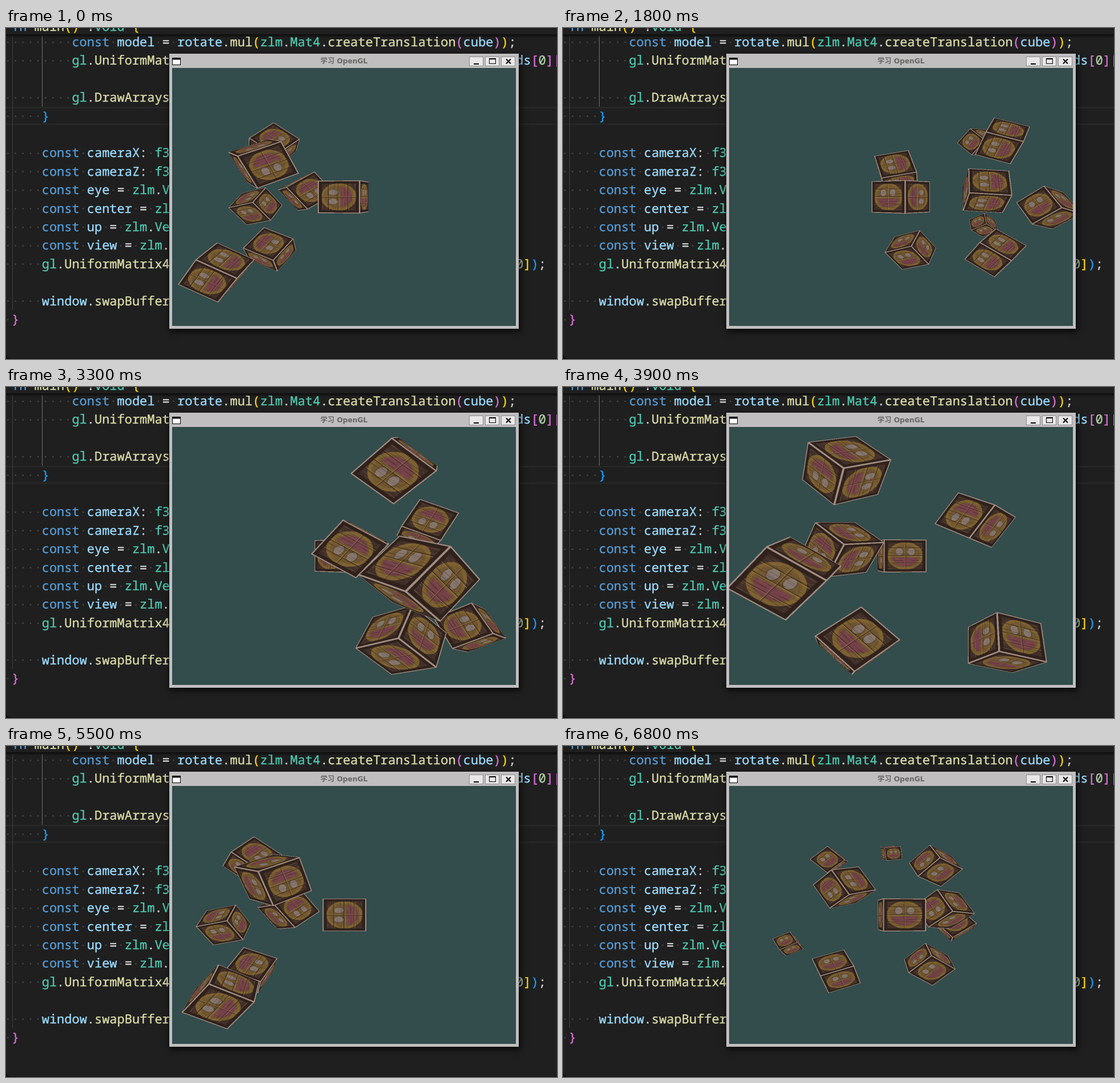
Recreate the animation shown at these times as an HTML page with a canvas. Size 965 by 580 pixels, loop 6.9 s.

```html
<!DOCTYPE html>
<html lang="en">
<head>
<meta charset="utf-8">
<title>Orbiting crates</title>
<style>
  html, body { margin: 0; width: 100%; height: 100%; overflow: hidden; background: #1f1f1f; }
  #stage { position: relative; width: 965px; height: 580px; overflow: hidden; background: #1f1f1f; }
  #editor { position: absolute; left: 0; top: 0; }
  #editor text {
    font: 21.97px "Noto Sans Mono", "DejaVu Sans Mono", monospace;
    text-rendering: geometricPrecision; white-space: pre; stroke-width: .35px;
  }
  #win {
    position: absolute; left: 286px; top: 45px; width: 612px; height: 482px;
    background: #c1bebf; box-shadow: 2px 4px 10px 1px rgba(0,0,0,.75);
  }
  #title {
    position: absolute; left: 0; right: 0; top: 4px; height: 19px;
    text-align: center; color: #696765;
    font: bold 12.2px/19px "DejaVu Sans", "Noto Sans CJK SC", "Noto Sans CJK", sans-serif;
  }
  #chrome { position: absolute; left: 0; top: 0; }
  #view { position: absolute; left: 5px; top: 25px; width: 602px; height: 452px; background: #334c4c; }
</style>
</head>
<body>
<div id="stage">
  <svg id="editor" width="965" height="580">
    <defs>
      <linearGradient id="fade" x1="0" y1="0" x2="0" y2="1">
        <stop offset="0" stop-color="#000" stop-opacity=".6"/>
        <stop offset="1" stop-color="#000" stop-opacity="0"/>
      </linearGradient>
    </defs>
    <path d="M0 139.5H965M0 168.5H965" stroke="#2b2b2b" stroke-width="2"/>
    <path d="M11.5 14V494" stroke="#404040"/>
    <path d="M63.5 14V138" stroke="#707070"/>
    <g id="code"></g>
    <rect y="11" width="965" height="6" fill="url(#fade)"/>
    <path d="M0 571Q1 579 9 579H965V580H0Z" fill="#111"/>
  </svg>
  <div id="win">
    <div id="title">学习 OpenGL</div>
    <svg id="chrome" width="612" height="26" fill="none" stroke="#000">
      <rect x="5.5" y="7.5" width="14" height="12" fill="#fff"/>
      <path d="M5 9H20" stroke-width="3"/>
      <g fill="#e9e7e7" stroke="#8d8a8b">
        <rect x="525.5" y="5.5" width="24" height="16"/>
        <rect x="553.5" y="5.5" width="24" height="16"/>
        <rect x="581.5" y="5.5" width="24" height="16"/>
      </g>
      <path d="M533 18H542" stroke-width="2"/>
      <rect x="560.5" y="8.5" width="11" height="9"/>
      <path d="M560 9.5H572"/>
      <path d="M590 9.5L598 17.5M598 9.5L590 17.5" stroke-width="2"/>
    </svg>
    <canvas id="view" width="1204" height="904"></canvas>
  </div>
</div>
<script>
// ---- Editor text: [row, column, first bracket level, code]
const CELL = 13.18, LEFT = 10, PITCH = 32.4, BASE = 32;
const BRACKETS = ['#ffd700', '#da70d6', '#179fff'];
const TEAL = /^(zlm|gl|Mat4|Vec3|f32|void)$/, KEYWORD = /^(const|fn)$/;
const LINES = [
  [-0.83, 0, 0, 'fn main() !void {'],
  [0, 8, 3, 'const model = rotate.mul(zlm.Mat4.createTranslation(cube));'],
  [1, 8, 3, 'gl.UniformMatrix4fv(modelLocation, 1, gl.FALSE, &model.fields[0][0]);'],
  [3, 8, 3, 'gl.DrawArrays(gl.TRIANGLES, 0, 36);'],
  [4, 4, 3, '}'],
  [6, 4, 2, 'const cameraX: f32 = radius;'],
  [7, 4, 2, 'const cameraZ: f32 = radius;'],
  [8, 4, 2, 'const eye = zlm.Vec3.new();'],
  [9, 4, 2, 'const center = zlm.Vec3.zero;'],
  [10, 4, 2, 'const up = zlm.Vec3.unitY;'],
  [11, 4, 2, 'const view = zlm.Mat4.createLookAt();'],
  [12, 4, 2, 'gl.UniformMatrix4fv(viewLocation, 1, gl.FALSE, &view.fields[0][0]);'],
  [14, 4, 2, 'window.swapBuffers();'],
  [15, 0, 2, '}'],
];

const svgNode = (tag, attrs) => {
  const node = document.createElementNS('http://www.w3.org/2000/svg', tag);
  for (const key in attrs) node.setAttribute(key, attrs[key]);
  return document.getElementById('code').appendChild(node);
};

function wordColor(word, next) {
  if (KEYWORD.test(word)) return '#569cd6';
  if (TEAL.test(word)) return '#4ec9b0';
  if (/^\d/.test(word)) return '#b5cea8';
  if (/^\w/.test(word)) return next === '(' ? '#dcdcaa' : '#9cdcfe';
  return '#d4d4d4';
}

for (const [row, col, level, code] of LINES) {
  const y = BASE + row * PITCH;
  const dot = c => svgNode('circle', { cx: LEFT + (c + .5) * CELL, cy: y - 7, r: 1.5, fill: '#424242' });
  if (row >= 0) for (let c = -1; c < col; c++) dot(c);
  let depth = level;
  for (const m of code.matchAll(/\w+|\s|[^\w\s]/g)) {
    const word = m[0], c = col + m.index;
    if (word === ' ') { dot(c); continue; }
    let fill = wordColor(word, code[m.index + word.length]);
    if (/[)\]}]/.test(word)) fill = BRACKETS[--depth % 3];
    if (/[(\[{]/.test(word)) fill = BRACKETS[depth++ % 3];
    svgNode('text', { x: LEFT + c * CELL, y, fill, stroke: fill }).textContent = word;
  }
}

// ---- Crate texture: dark planks with a faint smiley
const SIZE = 128;
function makeTexture() {
  const canvas = document.createElement('canvas');
  canvas.width = canvas.height = SIZE;
  const g = canvas.getContext('2d');
  g.scale(SIZE, SIZE);
  let seed = 7;
  const rand = () => (seed = seed * 16807 % 2147483647) / 2147483647;
  const box = (fill, x, y, w, h) => { g.fillStyle = fill; g.fillRect(x, y, w, h); };
  const oval = (fill, x, y, rx, ry, end = Math.PI * 2) => {
    g.fillStyle = fill;
    g.beginPath();
    g.ellipse(x, y, rx, ry, 0, 0, end);
    g.fill();
  };
  box('#412f29', 0, 0, 1, 1);
  oval('#7d6130', .5, .5, .42, .42);
  oval('#705630', .5, .5, .35, .35);
  for (const x of [.36, .64]) {
    oval('#5d482c', x, .37, .1, .13);
    oval('#85766f', x, .37, .085, .115);
  }
  oval('#744149', .5, .55, .3, .27, Math.PI);
  for (let i = 0; i < 150; i++) {
    const shade = rand() < .65 ? '30,18,14' : '165,130,90';
    box(`rgba(${shade},${.08 + rand() * .2})`, rand() * .9, rand(), .05 + rand() * .25, .012);
  }
  for (const y of [.27, .5, .73]) {
    box('rgba(35,22,16,.55)', .06, y - .016, .88, .016);
    box('rgba(180,150,95,.5)', .06, y, .88, .012);
  }
  box('rgba(35,22,16,.5)', .484, .06, .016, .88);
  box('rgba(180,150,95,.5)', .5, .06, .012, .88);
  g.strokeStyle = 'rgba(44,31,27,.85)';
  g.lineWidth = .08;
  g.strokeRect(.055, .055, .89, .89);
  g.strokeStyle = '#a38e82';
  g.lineWidth = .045;
  g.strokeRect(0, 0, 1, 1);
  return new Uint32Array(g.getImageData(0, 0, SIZE, SIZE).data.buffer);
}
const texture = makeTexture();

// ---- Scene
const CUBES = [
  [0, 0, 0], [2, 5, -15], [-1.5, -2.2, -2.5], [-3.8, -2, -12.3], [2.4, -.4, -3.5],
  [-1.7, 3, -7.5], [1.3, -2, -2.5], [1.5, 2, -2.5], [1.5, .2, -1.5], [-1.3, 1, -1.5],
];
// corner, texture u direction, texture v direction
const FACES = [-.5, .5].flatMap(s => [
  [[-.5, -.5, s], [1, 0, 0], [0, 1, 0]],
  [[s, -.5, .5], [0, 1, 0], [0, 0, -1]],
  [[-.5, s, .5], [1, 0, 0], [0, 0, -1]],
]);
const AXIS = [1, .3, .5].map(v => v / Math.hypot(1, .3, .5));
const RADIUS = 10, START = -1.32, SPEED = 1.093;
const LOOP = 6900, STEP = 100;

const dot3 = (a, b) => a[0] * b[0] + a[1] * b[1] + a[2] * b[2];
const cross = (a, b) => [a[1] * b[2] - a[2] * b[1], a[2] * b[0] - a[0] * b[2], a[0] * b[1] - a[1] * b[0]];
const add = (...vs) => [0, 1, 2].map(i => vs.reduce((sum, v) => sum + v[i], 0));

function spin(p, angle) {
  const c = Math.cos(angle), s = Math.sin(angle);
  const w = cross(AXIS, p), k = dot3(AXIS, p) * (1 - c);
  return p.map((v, i) => v * c + w[i] * s + AXIS[i] * k);
}

const ctx = document.getElementById('view').getContext('2d');
const { width: W, height: H } = ctx.canvas;
const image = ctx.createImageData(W, H);
const pixels = new Uint32Array(image.data.buffer);
const nearness = new Float32Array(W * H);
// The projection is square, stretched to the viewport.
const ZOOM = 1 / Math.tan(Math.PI / 8), FX = W / 2 * ZOOM, FY = H / 2 * ZOOM;

function drawFace(o, a, b) {
  const n = cross(a, b), toU = cross(b, o), toV = cross(o, a), gap = dot3(o, n);
  const corners = [o, add(o, a), add(o, b), add(o, a, b)];
  if (corners.some(p => p[2] < .1)) return;
  const xs = corners.map(p => W / 2 + p[0] / p[2] * FX);
  const ys = corners.map(p => H / 2 - p[1] / p[2] * FY);
  const x0 = Math.max(0, Math.floor(Math.min(...xs))), x1 = Math.min(W, Math.ceil(Math.max(...xs)));
  const y0 = Math.max(0, Math.floor(Math.min(...ys))), y1 = Math.min(H, Math.ceil(Math.max(...ys)));
  for (let y = y0; y < y1; y++) {
    const ry = (H / 2 - y - .5) / FY;
    for (let x = x0; x < x1; x++) {
      const rx = (x + .5 - W / 2) / FX;
      const d = rx * n[0] + ry * n[1] + n[2];
      const u = (rx * toU[0] + ry * toU[1] + toU[2]) / d;
      const v = (rx * toV[0] + ry * toV[1] + toV[2]) / d;
      if (!(u >= 0 && u < 1 && v > 0 && v <= 1)) continue;
      const near = d / gap, at = y * W + x;
      if (near <= nearness[at]) continue;
      nearness[at] = near;
      pixels[at] = texture[((1 - v) * SIZE | 0) * SIZE + (u * SIZE | 0)];
    }
  }
}

function drawScene(seconds) {
  const turn = START + SPEED * seconds, c = Math.cos(turn), s = Math.sin(turn);
  const look = p => [p[0] * c - p[2] * s, p[1], -p[0] * s - p[2] * c];
  pixels.fill(0xff4c4c33);
  nearness.fill(0);
  CUBES.forEach((pos, i) => {
    const center = add(look(pos), [0, 0, RADIUS]);
    if (center[2] < 1) return;
    const place = p => look(spin(p, i * Math.PI / 9));
    for (const [o, a, b] of FACES) drawFace(add(center, place(o)), place(a), place(b));
  });
  ctx.putImageData(image, 0, 0);
}

const began = performance.now();
let shown = -1;
function tick() {
  const step = Math.floor((performance.now() - began) % LOOP / STEP);
  if (step !== shown) {
    shown = step;
    drawScene(step * STEP / 1000);
  }
  requestAnimationFrame(tick);
}
tick();
</script>
</body>
</html>
```
